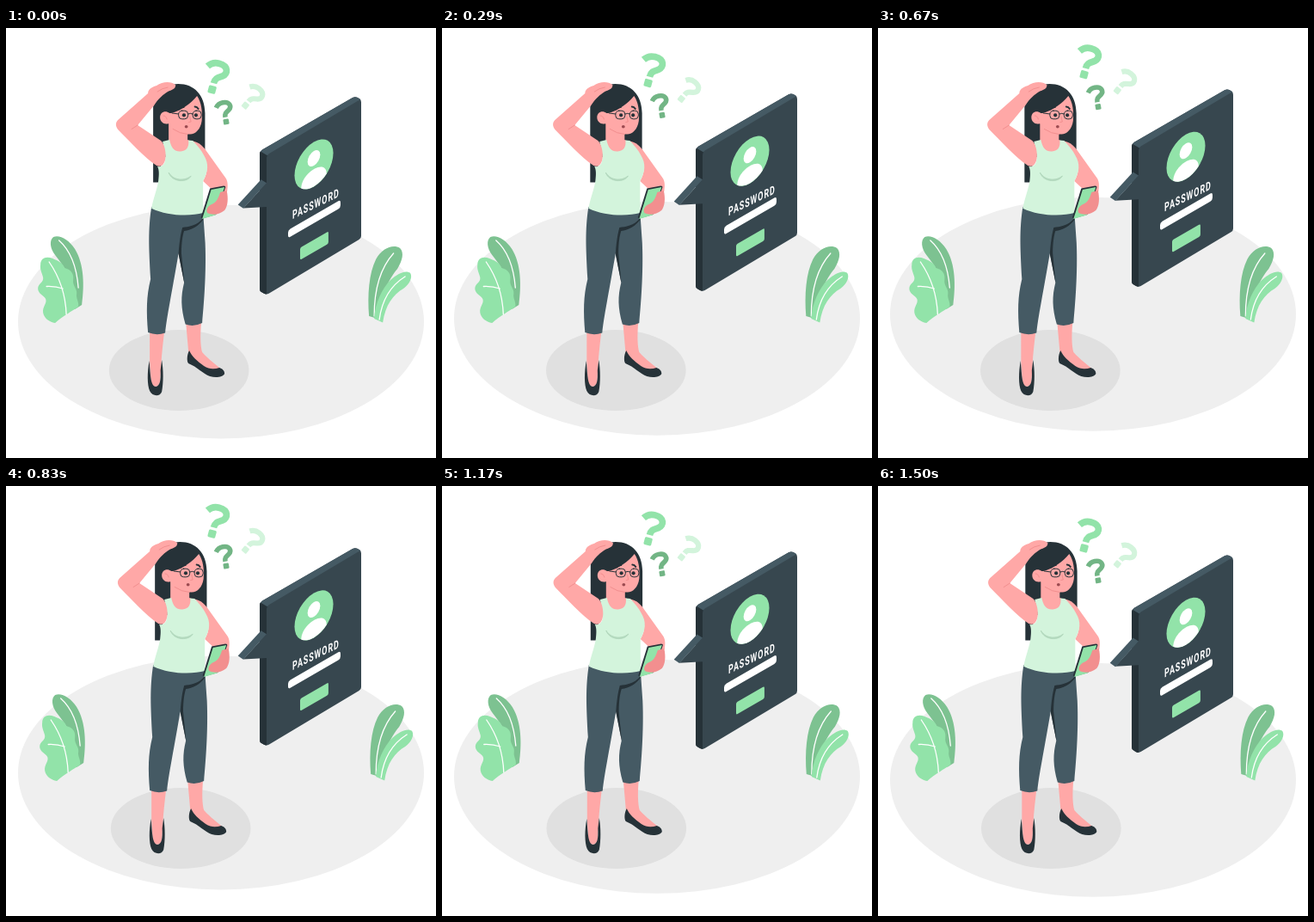
An HTML page that plays this animation: 500x500 px, repeating every 1540 ms.

```html
<!DOCTYPE html>
<html lang="en">
<head>
<meta charset="utf-8">
<title>Forgotten password</title>
<style>
  html, body { margin: 0; height: 100%; overflow: hidden; background: #fff; }
  svg { display: block; width: 100vw; height: 100vh; }
  .skin { fill: #ffa8a7; }
  .blush { fill: #f28f8f; }
  .ink { fill: #263238; }
  .slate { fill: #37474f; }
  .steel { fill: #455a64; }
  .mint { fill: #92e3a9; }
  .fern { fill: #7dc291; }
  .pale { fill: #d3f4dc; }
  .white { fill: #fff; }
  .line { fill: none; stroke: #fff; stroke-width: 1.3; stroke-linecap: round; }
  .thin { fill: none; stroke: #263238; stroke-width: 1; stroke-linecap: round; }
  .fold { fill: none; stroke: #f28f8f; stroke-width: 1; stroke-linecap: round; }
  text { font: 700 14px Roboto, sans-serif; letter-spacing: 1.4px; }
</style>
</head>
<body>
<svg viewBox="0 0 500 500">
  <defs>
    <g id="query">
      <path d="M-13 -9.5C-10 -14 -6 -16 -1 -16C11 -16 12 -7 7 -3C1 1 -1 2 -1 8" fill="none" stroke="currentColor" stroke-width="7.7"/>
      <rect x="-5.4" y="11" width="9" height="9" rx="1.5" fill="currentColor"/>
    </g>
  </defs>

  <g id="panel">
    <ellipse cx="250" cy="342" rx="236" ry="136" fill="#efefef"/>
    <path class="slate" d="M295 147Q295 144 298 142L403 81.500Q406 80 409 81.500L411.500 83Q413 84.300 413 87V242.500Q413 245 410.500 246.500L306 309Q303 311 300 309.300L297 307.500Q295 306.500 295 304Z"/>
    <path class="ink" d="M295 147Q295 145 296 144L304 148.500Q303 150 303 152V310Q301 310 300 309.300L297 307.500Q295 306.500 295 304Z"/>
    <path class="steel" d="M296 144L298 142L403 81.500Q406 80 409 81.500L412.500 83.800Q411 84 409.500 85L306 146.500Q304.500 147.500 304 148.700Z"/>
    <path class="slate" d="M276 210L303 180.500V208.500Z"/>
    <path class="steel" d="M269.700 206L296.500 176.700L303 180.700L276 210.300Z"/>
    <g transform="matrix(.866 -.5 0 1 358 159)">
      <circle class="mint" r="26"/>
      <circle class="white" cy="-7" r="8.500"/>
      <path class="white" d="M-17 19.500C-17 1 17 1 17 19.500A26 26 0 0 1 -17 19.500Z"/>
    </g>
    <text class="white" transform="matrix(.64 -.31 0 1 333 222.800)">PASSWORD</text>
    <rect class="white" transform="matrix(.866 -.5 0 1 328 235.500)" width="70.400" height="9.300" rx="3"/>
    <rect class="mint" transform="matrix(.866 -.5 0 1 342 256)" width="38" height="14.300" rx="2"/>
  </g>

  <g id="queries">
    <use href="#query" color="#92e3a9" transform="translate(244.500 58) rotate(15)"/>
    <use href="#query" color="#72b585" transform="translate(254.700 99) rotate(-10) scale(.72)"/>
    <use href="#query" color="#d3f4dc" transform="translate(286.700 82) rotate(39) scale(.8)"/>
  </g>

  <g id="figure">
    <ellipse cx="201" cy="398" rx="81.300" ry="47" fill="#e0e0e0"/>

    <!-- plants -->
    <path class="fern" d="M88 322C91 300 91 275 80 257C73 246 62 240 55 243C50 247 51 256 57 264C66 276 77 290 78 303L80 327Z"/>
    <path class="line" d="M61.500 247C74 258 82 277 84 302"/>
    <path class="mint" d="M57 343C50 342 44 337 43 331C42 324 48 320 46 315C44 311 37 309 37 303C37 297 44 296 43 290C42 285 39 281 40 275C40 267 47 265 54 268C62 271 66 274 68 279C76 281 79 286 78 293C77 300 83 303 82 309C81 315 85 318 84 324C77 329 66 335 57 343Z"/>
    <path class="line" d="M50 272C59 285 69 306 70 333M47 300.500Q57 300 66 303"/>
    <path class="fern" d="M422 335C420 310 422 285 430 269C437 256 450 251 458 256C463 261 461 270 455 280C445 292 436 310 432 338Z"/>
    <path class="line" d="M450.500 262C436 278 428 302 428 335"/>
    <path class="mint" d="M438 342.500L428 338C429 320 437 303 447 293C456 285 465 281 470 285C473 290 469 298 462 303C450 310 441 322 438 342.500Z"/>
    <path class="line" d="M464 289C448 299 437 316 434 339"/>

    <!-- legs -->
    <path class="skin" d="M167 352L184 353C182 370 181 380 180.500 388L179 412C177 418.500 170 418 168.500 412L167 388Z"/>
    <path class="ink" d="M166.500 387C164 400 164 415 167 422C170 428.500 179 429 181 423C183 412 183 398 181 386L179.500 398C180 410 179 416 174 417C168 416 168 405 166.500 387Z"/>
    <path class="skin" d="M209 342L227 341C225.500 358 226 370 228 377C236 386 244 391 249 396C240 400 228 398 222 391C216 385 213 381 212 376Z"/>
    <path class="ink" d="M213 375C210 380 210 388 212 390C222 394 229 402 237 405C244 407 252 406 254 402C254 398 251 396 248 395C242 397 236 397 230 393C222 387 216 382 213 375Z"/>
    <path class="steel" d="M169 208C165 235 166 255 168 292C163 312 163 330 165 354Q175 358 185 354.500C187 335 192 312 200.500 262L207 296C203 312 203 325 208.500 344.500Q218 348 228 343C230 320 233 285 231.500 250L229 214Z"/>
    <path class="ink" d="M229 221C222 230 212 231 205 232C202 243 201 255 200.500 263L207.300 297L203.800 262C204 250 205 242 207 236C216 235 224 230 229 223Z"/>

    <!-- hair and head -->
    <path class="ink" d="M171 179.500V95C171 76 184 65 200 65C219 65 231 78 231.300 99V150H180V179.500Z"/>
    <path class="skin" d="M189 106V132L188 146H214L216 132L211 130V118Z"/>
    <path class="skin" d="M222 79C227 86 228.500 97 227.500 108C226 118 220 124 213 123.500C206 123 198 121 192 116L189 111C184 113 179 109 179 104C179 98 185 95 190 99L192 99C203 96 215 88 222 79Z"/>
    <path class="fold" d="M194 117.500Q202 123 211 123.500M213.500 103L215 109L212.500 109.500M183 102Q186 102 187 106"/>
    <rect class="thin" x="200.500" y="96.200" width="11" height="9.600" rx="4"/>
    <rect class="thin" x="217" y="96.200" width="10" height="9.600" rx="4"/>
    <path class="thin" d="M193 99L200.500 100M211.500 100Q214.500 98.500 217 100"/>
    <circle class="ink" cx="206.800" cy="101.300" r="2.100"/>
    <circle class="ink" cx="220.800" cy="101.300" r="2.100"/>
    <path class="thin" style="stroke-width:2" d="M201.500 94.500Q203.500 91.800 206.500 92M219.500 91.500Q222 91.500 223.500 94"/>
    <ellipse cx="209.500" cy="114.700" rx="1.900" ry="1.700" fill="#9b4a50"/>

    <!-- torso and arms -->
    <path class="skin" d="M214 131C226 132 231 140 235 146L255 174C258 178 258 183 257 190L244 192L229 178C235 168 235 158 228 148Z"/>
    <path class="pale" d="M182 132L190 130C192 140 196 144 203 143.500C210 143 213 138 212 130.500L217 131C222 136 227 142 230 148C236 158 235 167 229 178V215C215 219 188 219 169 209.700C171 199 176 186 177 178C178 170 178 165 176 161C183 162 186 157 185 147Z"/>
    <path d="M189 168C193 180 211 180 215 172C208 178 195 178 189 168Z" fill="#b3d9be" stroke="#b3d9be"/>
    <path class="skin" d="M197 66C192 62 182 62 175 67C168 69 165 72 165 76L130 107C127 110 127 114 130 118C144 132 160 150 175 160C182 163 185.500 156 185.500 148C185.500 140 183 134 180 131L153 113L172 90C177 82 183 77 188 74C192 72 197 71 197 67Z"/>
    <path class="fold" d="M146 117.500L153 113M176 74Q181 70 188 69"/>
    <path class="ink" d="M237 186.500L253 183.500Q255.500 183.500 255 185.500L244 217L228 221.500L226.500 220.500Z"/>
    <path class="mint" d="M238.500 188L254 185L243.500 217.500L228 222Z"/>
    <path class="blush" d="M256.500 189C258.500 198 258 207 254 212C248 217 240 218 234 215C232 211 235 207 239 205C245 203 247 197 249 191Z"/>
  </g>
</svg>
<script>
  const LOOP = 1540, PERIOD = 1530, LEAD = 42, FPS = 24;
  const SHAKE = [0, -1, 2, -4, 4, -4, 4, -4, 2, -1, 0];

  const move = (id, x, y) =>
    document.getElementById(id).setAttribute('transform', `translate(${x} ${y})`);

  function shake(phase) {
    const i = Math.floor(phase * 10), f = phase * 10 - i;
    return SHAKE[i] + (SHAKE[i + 1] - SHAKE[i]) * f;
  }

  function draw(now) {
    // Motion advances in 24 fps steps; the small bias absorbs timer rounding.
    const step = Math.floor((now + 6) % LOOP * FPS / 1000);
    const phase = (step * 1000 / FPS + LEAD) / PERIOD % 1;
    const lift = 1 - Math.abs(1 - 2 * phase);
    move('panel', 0, -10 * lift);
    move('queries', 0, -20 * lift);
    move('figure', shake(phase) + 0.4, 0);
  }

  const start = performance.now();
  function tick() {
    draw(performance.now() - start);
    requestAnimationFrame(tick);
  }
  tick();
</script>
</body>
</html>
```
